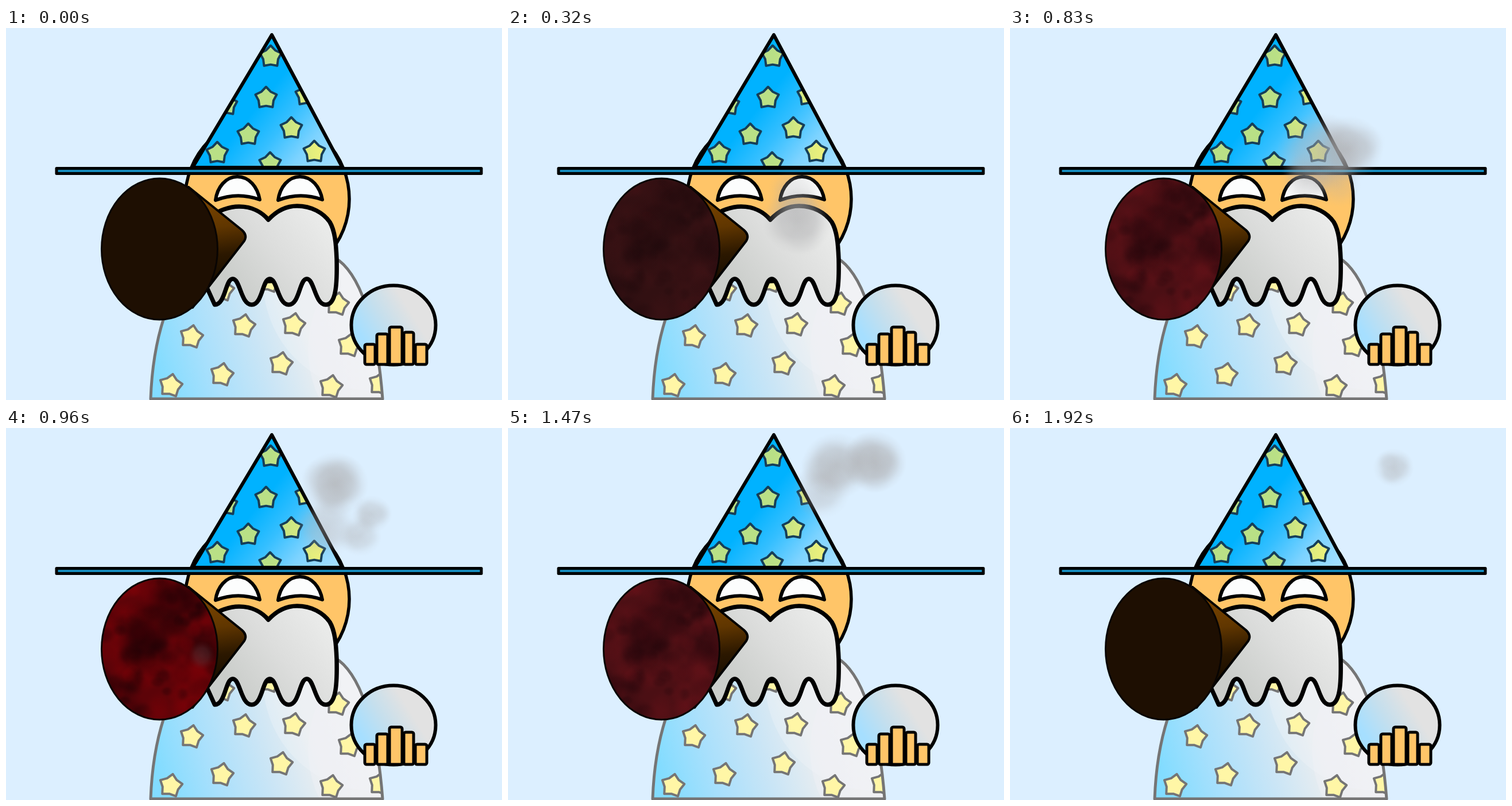
An HTML page with a canvas that plays this animation: 864 px wide and 648 px high, repeating every 2240 ms.

```html
<!DOCTYPE html>
<html lang="en">
<head>
<meta charset="utf-8">
<title>Wizard with horn</title>
<style>
html, body { margin: 0; width: 100%; height: 100%; overflow: hidden; background: #dcefff; }
canvas { display: block; width: 864px; height: 648px; }
</style>
</head>
<body>
<canvas id="stage" width="864" height="648"></canvas>
<script>
const W = 864, H = 648, STEP = 320, COUNT = 7;
const SKIN = '#ffc568', INK = '#000';
const ctx = document.getElementById('stage').getContext('2d');
ctx.lineJoin = ctx.lineCap = 'round';

function paint(path, fill, stroke, width) {
  if (fill) { ctx.fillStyle = fill; ctx.fill(path); }
  if (stroke) { ctx.strokeStyle = stroke; ctx.lineWidth = width; ctx.stroke(path); }
}

function linear(x0, y0, x1, y1, ...colors) {
  const g = ctx.createLinearGradient(x0, y0, x1, y1);
  colors.forEach((c, i) => g.addColorStop(i / (colors.length - 1), c));
  return g;
}

function oval(x, y, rx, ry) {
  const p = new Path2D();
  p.ellipse(x, y, rx, ry, 0, 0, Math.PI * 2);
  return p;
}

function star(x, y, r, turn) {
  const p = new Path2D();
  for (let i = 0; i < 10; i++) {
    const a = turn * Math.PI / 180 + i * Math.PI / 5;
    const d = i % 2 ? r * 0.7 : r;
    p.lineTo(x + d * Math.sin(a), y - d * Math.cos(a));
  }
  p.closePath();
  return p;
}

function clipped(path, draw) {
  ctx.save();
  ctx.clip(path);
  draw();
  ctx.restore();
}

// Soft round smudge; rgb is "r,g,b"
function puff(x, y, rx, ry, rgb, alpha) {
  ctx.save();
  ctx.translate(x, y);
  ctx.scale(rx, ry);
  const g = ctx.createRadialGradient(0, 0, 0, 0, 0, 1);
  g.addColorStop(0, `rgba(${rgb},${alpha})`);
  g.addColorStop(0.5, `rgba(${rgb},${alpha * 0.75})`);
  g.addColorStop(0.8, `rgba(${rgb},${alpha * 0.22})`);
  g.addColorStop(1, `rgba(${rgb},0)`);
  ctx.fillStyle = g;
  ctx.fillRect(-1, -1, 2, 2);
  ctx.restore();
}

function seeded(seed) {
  return () => {
    seed = (seed * 1664525 + 1013904223) % 4294967296;
    return seed / 4294967296;
  };
}

function makeBeard() {
  const p = new Path2D('M350 330C366 322 384 311 406 311C430 311 447 322 457 334' +
    'C470 320 486 310 507 310C532 310 553 322 564 338C573 353 575 376 576 402');
  const top = 437, low = 482;
  p.bezierCurveTo(577, 446, 575, low, 557, low);
  for (let x = 557; x > 370; x -= 64.5) {
    const peak = x - 33, next = x - 64.5;
    p.bezierCurveTo(x - 19, low, peak + 13, top, peak, top);
    p.bezierCurveTo(peak - 13, top, next + 19, low, next, low);
  }
  p.lineTo(340, 430);
  return p;
}

const robeShape = new Path2D(
  'M252 646C254 590 262 545 275 505Q320 385 455 385Q545 383 580 405C625 440 648 540 656 646Z');
const hatShape = new Path2D('M463 12L325 243H586Z');
const coneShape = new Path2D('M318 277L411 352Q421 361 415 371L325 487L280 385Z');
const mouth = oval(267.5, 385, 101, 123);

const robeStars = [
  [323, 538], [414, 519], [501, 517], [376, 604], [287, 623], [479, 585],
  [566, 625], [577, 481], [598, 553], [652, 620], [458, 441], [377, 456]
];
const hatStars = [
  [461, 50], [453, 122], [422, 186], [497, 175], [368, 218], [537, 216], [460, 236], [384, 134], [523, 117]
];

function drawRobe() {
  paint(robeShape, linear(262, 590, 600, 480, '#82dcff', '#a9e0fc', '#c9e5f6', '#e9edf0', '#f0f0f1'));
  clipped(robeShape, () => {
    paint(oval(640, 440, 192, 192), 'rgba(242,244,248,.3)');
    paint(oval(692, 560, 166, 180), 'rgba(240,241,245,.4)');
    for (const [x, y] of robeStars) paint(star(x, y, 20.5, 10), '#fff6a6', '#757575', 4);
  });
  paint(robeShape, null, '#757575', 5);
}

function drawHat() {
  paint(hatShape, linear(435, 140, 565, 245, '#00b2ff', '#35bfff', '#7dd3ff', '#a2deff'));
  const fill = linear(380, 0, 545, 0, '#b9e086', '#b9e086', '#eaf07c');
  clipped(hatShape, () => {
    for (const [x, y] of hatStars) paint(star(x, y, 19.5, 0), fill, '#163e58', 4);
  });
  paint(hatShape, null, INK, 6);
  const brim = new Path2D();
  brim.rect(88, 244.5, 740, 9);
  paint(brim, '#168bbd', INK, 5);
}

function drawFace() {
  paint(oval(455, 298, 143, 144), SKIN, INK, 5.5);
  for (const x of [403, 512]) {
    const eye = new Path2D(
      `M${x - 38} 300C${x - 35} 277 ${x - 20} 259 ${x} 259C${x + 21} 259 ${x + 35} 277 ${x + 39} 299` +
      `Q${x} 285 ${x - 38} 300Z`);
    paint(eye, '#fcfdfd', INK, 6);
  }
}

function drawBall() {
  paint(oval(675, 517.5, 73.5, 69), linear(625, 545, 705, 495, '#a6dfff', '#c5dfed', '#e2e2e2'), INK, 6);
  const tops = [[625, 551, 18], [646, 533, 19], [668, 521, 22], [693, 530, 17], [713, 551, 20]];
  for (const [x, y, w] of tops) {
    const finger = new Path2D();
    finger.roundRect(x, y, w, 586 - y, 3);
    paint(finger, SKIN, INK, 5);
  }
}

const beardShape = makeBeard();

function drawScene() {
  ctx.fillStyle = '#dcefff';
  ctx.fillRect(0, 0, W, H);
  drawRobe();
  drawFace();
  drawHat();
  paint(beardShape, linear(390, 445, 545, 325, '#cacdca', '#dcdddc', '#eaebea'), INK, 7.5);
  drawBall();
  paint(coneShape, linear(365, 300, 385, 440, '#784300', '#603600', '#2c1800', '#160c00'), INK, 4);
}

// Inside the horn: base colour, bright and dark mottling, strength
const glows = [
  null,
  ['#321012', '72,20,23', '18,4,7', 0.16],
  ['#4b0f14', '108,18,25', '25,3,8', 0.24],
  ['#5c0308', '128,0,6', '22,0,4', 0.32]
];

function drawMouth(level) {
  paint(mouth, '#1e0f02');
  const glow = glows[level];
  if (glow) clipped(mouth, () => {
    const [base, light, dark, alpha] = glow;
    const rnd = seeded(41);
    paint(mouth, base);
    for (let i = 0; i < 150; i++) {
      const x = 165 + rnd() * 205, y = 260 + rnd() * 250, r = 9 + rnd() * 22;
      puff(x, y, r * (0.8 + rnd() * 0.6), r, i % 2 ? light : dark, alpha);
    }
    puff(238, 372, 45, 58, dark, alpha * 2);
    puff(295, 300, 52, 40, dark, alpha * 1.5);
    puff(325, 425, 45, 55, light, alpha * 1.3);
    if (level === 3) puff(341, 396, 23, 25, '105,75,80', 0.35);
  });
  paint(mouth, null, '#090503', 3);
}

// Smoke lobes per step: x, y, radius, opacity
const smoke = [
  [],
  [[505, 336, 58, 0.6], [500, 288, 46, 0.25]],
  [[590, 211, 58, 0.65], [540, 218, 72, 0.48], [518, 264, 46, 0.32], [568, 270, 42, 0.22]],
  [[573, 98, 56, 0.72], [558, 172, 54, 0.36], [637, 150, 33, 0.42], [617, 188, 36, 0.36]],
  [[572, 66, 58, 0.66], [638, 59, 54, 0.78], [546, 110, 48, 0.36]],
  [[648, 68, 48, 0.66], [613, 69, 38, 0.34]],
  [[668, 69, 34, 0.44]]
];

function drawSmoke(step) {
  const rnd = seeded(7 + step);
  for (const [x, y, r, a] of smoke[step]) {
    puff(x, y, r * 1.05, r, '174,174,176', a * 0.8);
    // Smaller wisps roughen the edge
    for (let i = 0; i < 6; i++) {
      const t = i + rnd(), d = r * (0.3 + rnd() * 0.25), s = r * 0.55;
      puff(x + d * Math.cos(t), y + d * Math.sin(t), s * 1.15, s, '172,172,174', a * 0.22);
    }
  }
}

function render(time) {
  const step = Math.floor(time / STEP) % COUNT;
  drawScene();
  drawMouth(Math.min(step, COUNT - 1 - step));
  drawSmoke(step);
}

const start = performance.now();
function tick() {
  render(performance.now() - start);
  requestAnimationFrame(tick);
}
tick();
</script>
</body>
</html>
```
